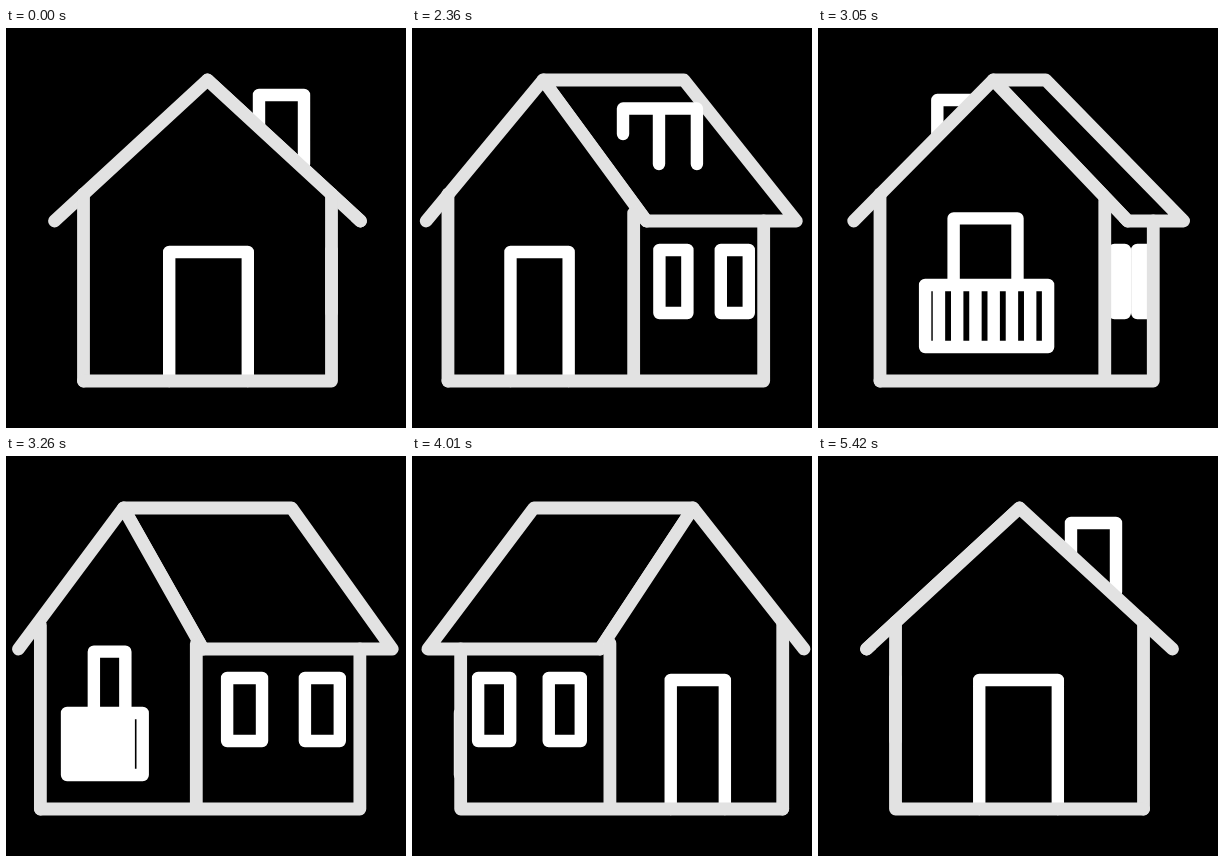
An HTML page for the animation above (5450 ms loop, 400 by 400 pixels).

```html
<!DOCTYPE html>
<html lang="en">
<head>
<meta charset="utf-8">
<title>Turning house</title>
<style>
  html, body { margin: 0; width: 100%; height: 100%; overflow: hidden; background: #000; }
  svg { display: block; width: 100vw; height: 100vh; }
  path { fill: none; stroke-linecap: round; stroke-linejoin: round; }
  .shell { stroke: #e2e2e2; stroke-width: 12.8; }
  .detail { stroke: #fff; stroke-width: 12.4; }
  .solid { fill: #000; }
</style>
</head>
<body>
<svg viewBox="0 0 400 400">
  <path id="chimneyBehind" class="detail"/>
  <path id="roof" class="shell solid"/>
  <path id="chimneyFront" class="detail"/>
  <path id="gable" class="shell solid"/>
  <path id="leadWall" class="shell"/>
  <path id="windows" class="detail"/>
  <path id="door" class="detail"/>
  <path id="balcony" class="detail"/>
  <path id="walls" class="shell"/>
</svg>
<script>
const LOOP = 5450, START = 2000, TURN = 3450, STEP = 30;
const CENTER = 201.5, RIDGE = 52, EAVE = 193, FLOOR = 353;
const RAIL_TOP = 257, RAIL_BOTTOM = 319;

const draw = (id, d) => document.getElementById(id).setAttribute('d', d);

// Piecewise linear value through equally spaced poses.
function pose(values, at) {
  const i = Math.min(Math.floor(at), values.length - 2);
  return values[i] + (values[i + 1] - values[i]) * (at - i);
}

// Cubic bezier easing (.18, 0, .237, 1).
function ease(x) {
  let low = 0, high = 1;
  for (let i = 0; i < 30; i++) {
    const q = (low + high) / 2, r = 1 - q;
    const bx = 3 * r * r * q * 0.18 + 3 * r * q * q * 0.237 + q * q * q;
    if (bx < x) low = q; else high = q;
  }
  return low * low * (3 - 2 * low);
}

function rect(a, b, top, bottom) {
  return `M${a} ${top}H${b}V${bottom}H${a}Z`;
}

function chimneyPath(turn, top) {
  const at = (values, t) => CENTER + pose(values, t);
  if (turn >= 4) {
    const outer = at([-96.5, -54, 0, 70, 96.5], turn - 4);
    const inner = at([-51.5, 0, 0, 20, 51.5], turn - 4);
    return `M${outer} 136V${top}H${inner}V106`;
  }
  const front = at([96.5, 40, -39, -97, -96.5], turn);
  const back = at([96.5, 82, 21, -54, -96.5], turn);
  const inner = turn < 2 ? at([51.5, 5, -39], turn) : at([21, -19, -51.5], turn - 2);
  const near = turn < 2 ? front : back;
  return `M${front} 136V${top}H${back}V136M${near} ${top}H${inner}V106`;
}

// turn runs from 0 to 8, an eighth of a revolution per unit.
function render(turn) {
  const phase = turn % 4;
  const side = phase < 2 ? phase : 4 - phase;   // 0: gable faces us, 2: long side faces us
  const flip = phase < 2 ? 1 : -1;
  const showsBack = turn >= 2 && turn < 6;
  const val = (...values) => pose(values, side);
  const px = offset => CENTER + flip * offset;
  const x = (...values) => px(val(...values));

  const leadEave = x(-153, -191, -175);
  const nearEave = x(153, 20, -176);
  const farEave = x(153, 186, 176);
  const apex = x(0, -78, -126.5);
  const farApex = x(0, 78, 126.5);
  draw('roof', `M${apex} ${RIDGE}H${farApex}L${farEave} ${EAVE}H${nearEave}Z`);
  draw('gable', `M${leadEave} ${EAVE}L${apex} ${RIDGE}L${nearEave} ${EAVE}`);

  const chimney = chimneyPath(turn, val(67, 82, 80));
  draw('chimneyBehind', turn >= 4 ? chimney : '');
  draw('chimneyFront', turn < 4 ? chimney : '');

  const lead = x(-124, -170, -147);
  const near = x(124, 9, -152);
  const far = x(124, 153, 148);
  draw('leadWall', `M${lead} ${val(166, 166, 193)}V${FLOOR}`);
  draw('walls', `M${lead} ${FLOOR}H${far}V${EAVE}M${near} ${val(166, 187, 193)}V${FLOOR}`);

  const half = val(0, 15.5, 31);
  draw('windows', [val(124, 53, -74), val(124, 121, 72)]
    .map(mid => rect(px(mid - half), px(mid + half), 222, 285)).join(''));

  const mid = showsBack ? val(-5, -91, -146) : val(1, -82, -150);
  const reach = showsBack ? val(39, 18, 0) : val(39.3, 28, 0);
  const top = showsBack ? val(188, 195, 200) : 224;
  const bottom = showsBack ? RAIL_TOP : FLOOR;
  draw('door', `M${px(mid - reach)} ${bottom}V${top}H${px(mid + reach)}V${bottom}`);

  if (showsBack) {
    let rails = rect(x(-73, -136.5, -168), x(70, -53, -147), RAIL_TOP, RAIL_BOTTOM);
    for (let i = 0; i < 6; i++) {
      rails += `M${x(49.6 - 20.4 * i, -66 - 14 * i, -168)} ${RAIL_TOP}V${RAIL_BOTTOM}`;
    }
    draw('balcony', rails);
  } else {
    // Seen from the other end, only its outer edge sticks out.
    draw('balcony', side > 1 ? rect(far, x(124, 153, 168), RAIL_TOP, RAIL_BOTTOM) : '');
  }
}

function frame() {
  const now = performance.now() % LOOP;
  const time = Math.floor((now - 20) / STEP) * STEP + 20;
  const progress = Math.min(Math.max((time - START) / TURN, 0), 1);
  render(time > START ? 8 * ease(progress) % 8 : 0);
  requestAnimationFrame(frame);
}
frame();
</script>
</body>
</html>
```
